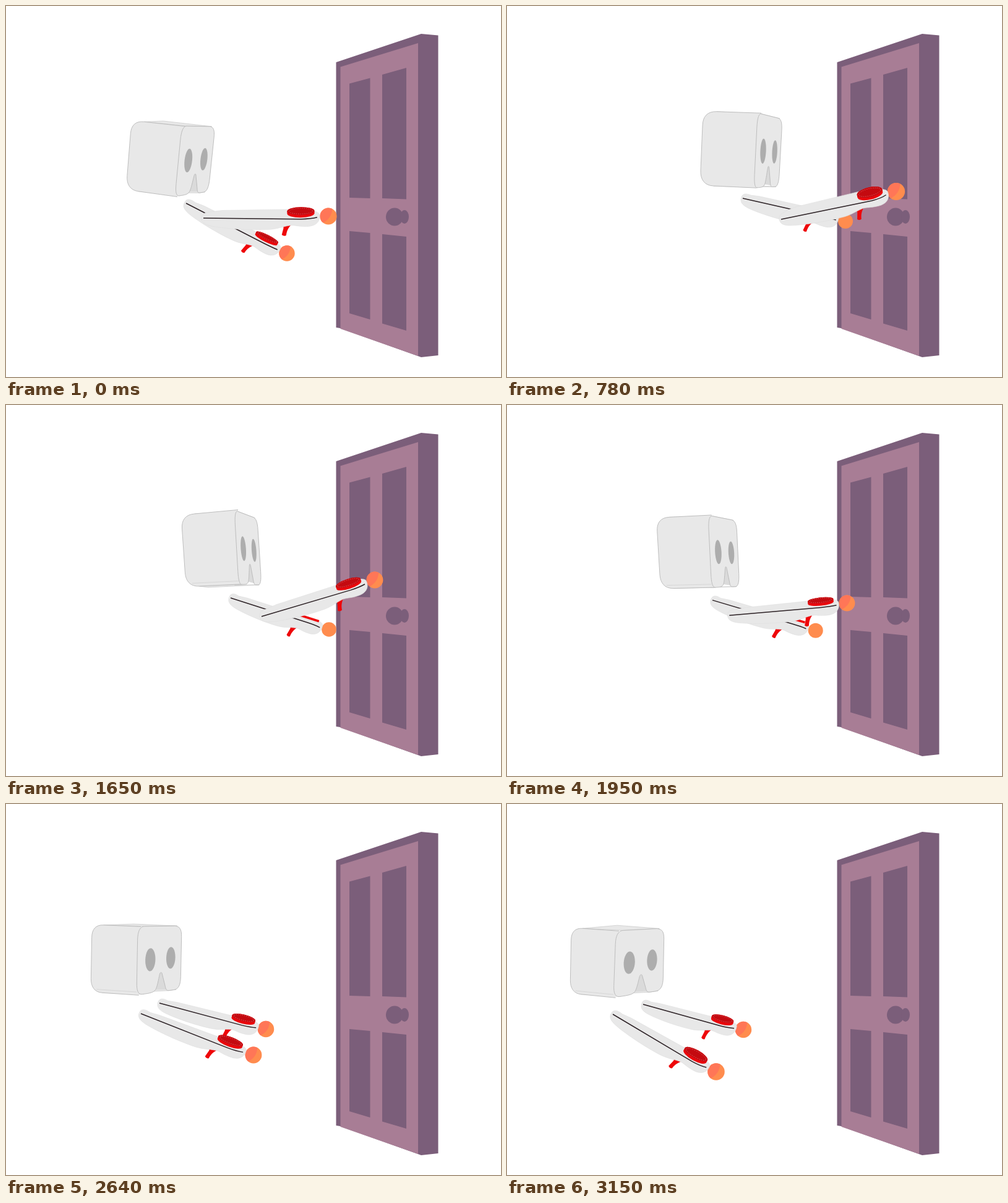
An HTML page with a canvas that plays this animation: 800 by 600 pixels, repeating every 3.18 s.

```html
<!DOCTYPE html>
<html lang="en">
<head>
<meta charset="utf-8">
<title>Headset and door</title>
<style>
html, body { margin: 0; width: 100%; height: 100%; overflow: hidden; background: #fff }
canvas { display: block }
</style>
</head>
<body>
<canvas id="stage" width="800" height="600"></canvas>
<script>
const ctx = document.getElementById('stage').getContext('2d');
const LOOP = 3180, STEP = 30;
const TIMES = [0, 330, 780, 1650, 2220, 2640, 3150];
const DARK = '#7b5e7a', LIGHT = '#a87d95', SHELL = '#e8e8e8', EDGE = '#b8b8b8';

// Corners: back top, back bottom, front top, front bottom, right top, right bottom
const HEAD = [
  [203, 185, 194, 297, 284, 194, 273, 308, 338, 195, 327, 300],
  [276, 175, 262, 291, 358, 185, 346, 303, 399, 191, 385, 297],
  [317, 170, 312, 290, 405, 173, 399, 294, 445, 183, 439, 292],
  [283, 178, 291, 294, 369, 170, 376, 290, 406, 184, 413, 291],
  [194, 187, 196, 300, 274, 187, 275, 301, 332, 191, 332, 296],
  [139, 195, 137, 304, 213, 198, 211, 309, 284, 197, 282, 299],
  [104, 200, 102, 306, 176, 205, 172, 313, 254, 201, 252, 301]
];
// Tail x, y, ball x, y, pad openness, height above the axis
const FAR_WAND = [
  [291, 319, 454, 400, 4, 9], [343, 315, 500, 410, 2, 9],
  [381, 311, 547, 348, 2, 9], [363, 312, 522, 363, 1.5, 8],
  [294, 319, 470, 365, 3, 8], [248, 322, 420, 364, 5.5, 8],
  [220, 324, 382, 365, 5.5, 8]
];
const NEAR_WAND = [
  [319, 343, 521, 340, 6.5, 12], [402, 346, 599, 285, 8, 14],
  [443, 345, 629, 300, 8, 14], [413, 342, 596, 283, 6, 11],
  [294, 339, 490, 360, 4, 9], [218, 339, 400, 406, 6, 8],
  [171, 340, 338, 433, 7, 9]
];

// Smooth curve through the poses; x values do not overshoot
function pose(keys, t) {
  const last = TIMES.length - 1;
  let i = 0;
  while (i < last - 1 && t >= TIMES[i + 1]) i++;
  const h = TIMES[i + 1] - TIMES[i], s = Math.min((t - TIMES[i]) / h, 1);
  const rate = (k, j) => (keys[k + 1][j] - keys[k][j]) / (TIMES[k + 1] - TIMES[k]);
  const slope = (k, j) => {
    if (k === 0) return rate(0, j);
    if (k === last) return rate(k - 1, j) * .7;
    const a = rate(k - 1, j), b = rate(k, j);
    if (j % 2 === 0) return a * b > 0 ? 2 * a * b / (a + b) : 0;
    const before = TIMES[k] - TIMES[k - 1], after = TIMES[k + 1] - TIMES[k];
    return (a * after + b * before) / (before + after);
  };
  const w = s * s * (3 - 2 * s);
  return keys[i].map((v, j) => v + (keys[i + 1][j] - v) * w +
    h * s * (1 - s) * ((1 - s) * slope(i, j) - s * slope(i + 1, j)));
}

// Runs ahead of time between two moments
function hurry(t, from, to, lead) {
  if (t <= from || t >= to) return t;
  return t + lead * Math.sin(Math.PI * (t - from) / (to - from)) ** 2;
}

function draw(fill, stroke, width = 1) {
  if (fill) { ctx.fillStyle = fill; ctx.fill(); }
  if (stroke) { ctx.strokeStyle = stroke; ctx.lineWidth = width; ctx.stroke(); }
}

// Traces SVG-like commands (M, L, C, Q, Z) through a coordinate map
function trace(map, d) {
  const calls = { M: 'moveTo', L: 'lineTo', C: 'bezierCurveTo', Q: 'quadraticCurveTo', Z: 'closePath' };
  ctx.beginPath();
  for (const [, cmd, rest] of d.matchAll(/([MLCQZ])([^MLCQZ]*)/g)) {
    const n = rest.trim().split(/[\s,]+/).map(Number), out = [];
    if (cmd !== 'Z') for (let i = 0; i < n.length; i += 2) out.push(...map(n[i], n[i + 1]));
    ctx[calls[cmd]](...out);
  }
}

function ellipse(x, y, rx, ry) {
  ctx.beginPath();
  ctx.ellipse(x, y, rx, ry, 0, 0, 7);
}

const plain = (x, y) => [x, y];

function drawDoor() {
  trace(plain, 'M533.5 91 L671 45 L698.5 47.5 L698.5 565 L671 568 L540 521 L533.5 520 Z');
  draw(DARK);
  trace(plain, 'M540.5 98.5 L666 60 L666 566 L540.5 522 Z');
  draw(LIGHT);
  for (const d of [
    'M555 125.500 L588.5 116.5 L588.5 311 L555 310 Z',
    'M608 111 L647 100 L647 312.5 L608 311 Z',
    'M555 364 L588.5 367 L588.5 507 L555 497 Z',
    'M608 369 L647 373 L647 525 L608 513.5 Z'
  ]) { trace(plain, d); draw(DARK); }
  ellipse(628, 341, 14, 14.5); draw(DARK);
  ellipse(644, 341, 7, 11); draw(DARK);
}

const quad = (a, b, c, d) => (u, v) => [0, 1].map(k =>
  (a[k] * (1 - u) + b[k] * u) * (1 - v) + (c[k] * (1 - u) + d[k] * u) * v);

function drawHead(n, showSeam) {
  const [bt, bb, ft, fb, rt, rb] = [0, 2, 4, 6, 8, 10].map(i => [n[i], n[i + 1]]);
  const shift = (p, a, b) => [p[0] + b[0] - a[0], p[1] + b[1] - a[1]];
  const top = quad(bt, shift(bt, ft, rt), ft, rt);
  const base = quad(bb, shift(bb, fb, rb), fb, rb);
  const side = quad(bt, ft, bb, fb), front = quad(ft, rt, fb, rb);

  trace(top, 'M0 .25 L.95 0 L.9 1 L.15 1 Z');
  draw(SHELL, '#c8c8c8', .7);
  trace(base, 'M0 .25 L.95 0 L.9 1 L.72 1 L.4 .75 L.15 1 Z');
  draw(SHELL, '#c8c8c8', .7);

  trace(side, 'M1.07 0 L.25 0 C.08 0 0 .07 0 .19 L0 .8 C0 .92 .08 1 .25 1 L1.05 1');
  draw(SHELL, EDGE, .9);
  if (showSeam) {
    trace(side, 'M.12 .955 L1 .955');
    draw(null, '#d2d2d2', .8);
  }

  trace(front, 'M.53 .71 L.43 .96 L.7 .98 L.57 .71 Z');
  draw('#dadada');
  trace(front, 'M0 .2 C0 .07 .05 0 .15 0 L.85 0 C.95 .01 1 .05 1 .17 L1 .8 ' +
    'C1 .93 .96 1 .85 1 L.74 1 C.66 1 .66 .95 .64 .9 L.57 .72 C.56 .7 .53 .7 .52 .73 ' +
    'C.49 .82 .47 .92 .43 .96 C.38 1 .3 1 .13 1 C.03 1 0 .93 0 .82 Z');
  draw(SHELL, EDGE, .9);

  for (const [u, v, ru, rv] of [[.3, .5, .115, .172], [.765, .495, .103, .168]]) {
    ctx.beginPath();
    for (let a = 0; a < 6.28; a += .2) ctx.lineTo(...front(u + ru * Math.cos(a), v + rv * Math.sin(a)));
    ctx.closePath();
    draw('#adadad');
  }
}

function drawWand([x, y, bx, by, open, high]) {
  const length = Math.hypot(bx - x, by - y), k = length / 200;
  const along = (px, py) => [px * k, py];
  const sag = Math.max(0, (open - 1.5) * .8), r = 11.3 + .35 * open;

  // Ball
  ellipse(bx, by, r, r);
  draw('#ff8c4e');
  if (open > 2.5) {
    ctx.beginPath();
    ctx.arc(bx, by, r, 2.25, 5.2);
    ctx.quadraticCurveTo(bx + r * .4, by + r * .25, bx + r * Math.cos(2.25), by + r * Math.sin(2.25));
    draw('#ff7657');
  }

  ctx.save();
  ctx.translate(x, y);
  ctx.rotate(Math.atan2(by - y, bx - x));

  // Trigger and body
  trace(along, 'M127 10 L140 13 C134 20 133 24 132 30 Q128 32 125 29 L128 18 Z');
  draw('#ee0609');
  trace(along, `M-3 0 C-3 -9 6 -9 14 ${-.85 * high} L30 ${-high} L130 ${-high} ` +
    `C150 ${-high} 186 -12 186 -2 C187 10 178 16 165 16 C150 16 145 13 138 14 ` +
    'C125 16 120 19 105 20 C70 21 30 17 12 13 C0 10 -3 6 -3 0 Z');
  draw(SHELL, '#dfdfdf', .6);
  trace(along, `M0 0 L156 ${sag} Q172 ${sag} 182 1.5`);
  draw(null, '#2b2024', 1.5);

  // Pad
  const px = length * .78, rx = length * .109;
  if (open > 2.5) {
    for (let d = 4; d >= 0; d -= 1) { ellipse(px, -9 + d, rx, open); draw('#ea080d'); }
    ellipse(px, -9, rx, open);
    draw('#c40a10');
    ctx.setLineDash([1.5, 1.8]);
    ellipse(px, -9, rx * .87, open * .72);
    draw(null, '#e06a6a', .8);
  } else {
    ctx.beginPath();
    ctx.rect(px - rx * .95, -9.5, rx * 1.9, 3.6);
    draw('#ee0609');
  }
  ctx.restore();
}

function render(t) {
  ctx.fillStyle = '#fff';
  ctx.fillRect(0, 0, 800, 600);
  drawDoor();
  const early = hurry(t, 330, 780, 84);
  drawHead(pose(HEAD, early), t > 1200);
  const wands = [pose(FAR_WAND, early), pose(NEAR_WAND, hurry(t, 780, 1650, 170))];
  if (t > 180 && t < 560) wands.reverse();
  wands.forEach(drawWand);
}

const start = performance.now();
function tick() {
  const t = (performance.now() - start) % LOOP;
  render(Math.floor(t / STEP) * STEP);
  requestAnimationFrame(tick);
}
tick();
</script>
</body>
</html>
```
